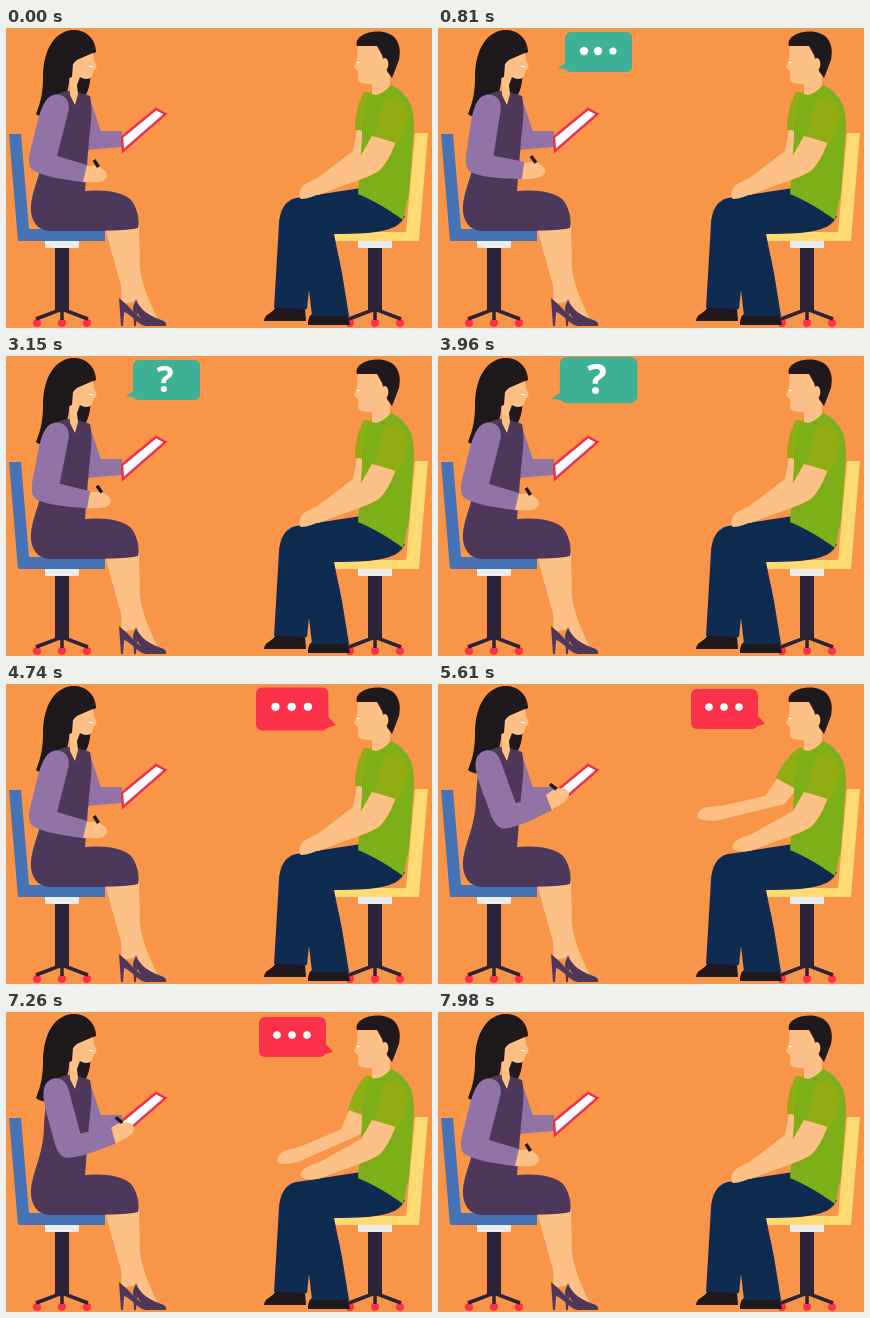
An HTML page that plays this animation: 426 px wide and 300 px high, repeating every 8010 ms.

```html
<!DOCTYPE html>
<html lang="en">
<head>
<meta charset="utf-8">
<title>Interview</title>
<style>
  html, body { margin: 0; width: 100%; height: 100%; overflow: hidden; background: #f99548; }
  svg { display: block; width: 426px; height: 300px; }
  .skin { fill: #fdc086; }
  .dark { fill: #1f191b; }
  .dress { fill: #4e3859; }
  .lilac { fill: #9273a6; }
  .shirt { fill: #7daf18; }
  .sleeve { fill: #91ad13; }
  .white { fill: #fff; }
  .post { fill: #2c2336; }
  .spokes { fill: none; stroke: #2c2336; stroke-width: 3.500; }
  .wheels { fill: #fc324b; }
  text { font: 700 36px "Open Sans", sans-serif; text-anchor: middle; }
</style>
</head>
<body>
<svg viewBox="0 0 426 300">
  <defs>
    <g id="base">
      <path fill="#ececec" d="M-17 213h34v7h-34z"/>
      <path class="post" d="M-7 220H7V284H-7z"/>
      <g class="wheels"><circle cx="-25" cy="295" r="4"/><circle cy="295" r="4"/><circle cx="25" cy="295" r="4"/></g>
      <path class="spokes" d="M-26 291L0 281 26 291M0 281V292"/>
    </g>
  </defs>
  <rect width="426" height="300" fill="#f99548"/>

  <!-- interviewer -->
  <use href="#base" x="56"/>
  <path fill="#4673b5" d="M3 106H15L23 201H99V213H12z"/>
  <path class="skin" d="M99 200L133 197 134 240C136 256 143 274 152 291L140 288 130 273 116 276 115 258z"/>
  <path class="dress" d="M113 270L121 277 131 287 146 298H139C130 295 126 287 118 284L117 298H115z"/>
  <path class="dress" d="M130 271C134 282 143 288 158 293Q161 296 160 298H147C138 295 134 288 131 285L130 298H128L127 279z"/>
  <path class="lilac" d="M80 70C87 74 90 90 95 103H116V119L80 122z"/>
  <path class="white" stroke="#f0304a" stroke-width="2.4" d="M116 109L150 81 159.500 86 117 123z"/>
  <path class="dark" d="M66 2C80 1 90 11 90 24L76 30 66 40C62 56 63 70 50 86 44 91 35 90 30 86 34 76 37 66 37 50 37 24 47 4 66 2z"/>
  <path class="dark" d="M70 46L84 44C85 54 83 62 78 70L70 72z"/>
  <path class="dress" d="M48 68Q60 61 72 64L84 68C87 80 85 95 83 112L79 163C98 161 117 164 124 171 131 178 134 192 132 200 120 203 104 202 96 203H45C31 203 24 192 25 177 26 164 32 152 35 138Q38 126 38 112L40 88Q41 73 48 68z"/>
  <path class="skin" d="M66 34L87 25 88 32 91 39 88 42 86 49Q80 53 74 49L71 57 72 66 69 77 64 67 63 38z"/>
  <path class="dark" d="M60 20L86 12 90 24C80 25 73 29 67 36L66 49 60 51z"/>
  <path class="white" d="M83 38h4v1h-4z"/>
  <g id="writeArm">
    <path class="skin" d="M77 138L90 138Q101 141 101 148C100 154 94 155 77 154z"/>
    <path id="pen" stroke="#1f191b" stroke-width="3.400" d="M88 132L92.500 139"/>
    <path class="lilac" d="M45 68C56 63 66 72 62 85L51 128 81 137 77 154C55 151 40 149 28 143 21 139 22 129 26 116 31 98 34 74 45 68z"/>
  </g>

  <!-- candidate -->
  <use href="#base" x="369"/>
  <path fill="#fedb72" d="M409 105H422L413 213H326V204H400z"/>
  <path class="dark" d="M270 279L299 280 300 293H258C258 286 267 285 270 279zM306 286H342L344 297H302C302 291 303 288 306 286z"/>
  <path fill="#0f2b50" d="M294 169.500L355 160 399 188C393 202 375 206 328 206L336 245 343 288 306 288 303 262 301 281 268 280 273 196C274 180 281 170 294 169.500z"/>
  <g id="talkArm">
    <path class="skin" d="M351 100L373 103 368 122 320 160C312 167 303 171 295 171 291 168 294 160 299 157L313 149 347 123z"/>
    <path class="sleeve" d="M358 64H368L374 104 349 102C349 86 353 72 358 64z"/>
  </g>
  <path class="skin" d="M352 18H378L384 40V62L375 68 366 66V56C360 56 354 56 352 52L352 43 348 39 351 31z"/>
  <path class="dark" d="M351 18C348 8 364 2 377 4 391 6 396 18 393 32L386 50 381 43 376 27 371 18z"/>
  <ellipse class="skin" cx="379" cy="36" rx="3.400" ry="6"/>
  <path class="white" d="M351 34h3v1h-3z"/>
  <path class="shirt" d="M362 67Q375 69 385 57C401 64 409 78 408 100L403 165 397 192C385 183 369 173 352 166L356 110C356 90 357 76 362 67z"/>
  <path class="skin" d="M366 108L390 113C386 125 380 136 373 143 360 151 340 156 320 164 310 169 300 168 295 165 293 160 299 154 312 151L355 127z"/>
  <path class="sleeve" d="M378 74C386 60 403 74 401 92L393 116 367 108C373 96 373 84 378 74z"/>

  <!-- speech -->
  <g id="ask" fill="#3eb096">
    <path d="M120 40L129 34 136 43z"/>
    <rect x="127" y="4" width="67" height="40" rx="6"/>
    <g id="askDots" class="white"><circle cx="146" cy="23"/><circle cx="160" cy="23"/><circle cx="175" cy="23"/></g>
    <g id="mark" class="white"><text x="159" y="36">?</text></g>
  </g>
  <g id="reply" fill="#fc324b">
    <path d="M327 40L319 31 312 44z"/>
    <rect x="253" y="5" width="67" height="40" rx="6"/>
    <g id="replyDots" class="white"><circle cx="271" cy="23"/><circle cx="286" cy="23"/><circle cx="301" cy="23"/></g>
  </g>
</svg>
<script>
const LOOP = 8010, PEAK = 1.17;
const $ = id => document.getElementById(id);

// piecewise linear value from [time, value] pairs
function at(t, keys) {
  if (t <= keys[0][0]) return keys[0][1];
  for (let i = 1; i < keys.length; i++) {
    const [t0, v0] = keys[i - 1], [t1, v1] = keys[i];
    if (t < t1) return v0 + (v1 - v0) * (t - t0) / (t1 - t0);
  }
  return keys[keys.length - 1][1];
}

const pop = (start, end) => [
  [start, 0], [start + 330, PEAK], [start + 560, 1],
  [end - 540, 1], [end - 310, PEAK], [end, 0]
];
const askPop = pop(30, 4290), replyPop = pop(4290, 7970);
const markPop = [[2580, 0], [2780, PEAK], [2940, 1], [3180, 1], [3300, 1.1], [3420, 1]];
const dotsOut = [[2460, 1], [2600, 0]];
const firstNote = [[560, 0], [840, 6], [1250, 14], [1700, 19.5], [2430, 11.7], [3420, 0]];
const gesture = [[4900, 0], [5370, 14.5], [5610, 24.6], [5900, 27.5], [6620, 27.5], [7980, 0]];

function scale(id, s, x, y) {
  $(id).setAttribute("transform", `translate(${x} ${y}) scale(${s}) translate(${-x} ${-y})`);
}
function turn(id, deg, x, y) {
  $(id).setAttribute("transform", `rotate(${deg} ${x} ${y})`);
}

// dots swell one after another
function dots(id, t, period, r) {
  [...$(id).children].forEach((dot, i) => {
    const d = (t % period) / period * 5 - i;
    const swell = d > 0 && d < 2 ? Math.sin(d * Math.PI / 2) : 0;
    dot.setAttribute("r", r + swell * .8);
  });
}

function draw(t) {
  const reach = t > 4740 && t < 7980 ? Math.sin((t - 4740) / 3240 * Math.PI) : 0;
  const note = t < 4000 ? at(t, firstNote) : 45.5 * reach;
  turn("writeArm", -note, 50, 80);
  turn("pen", note * .42, 92, 140);
  turn("talkArm", at(t, gesture), 362, 72);

  scale("ask", at(t, askPop), 160, 24);
  scale("reply", at(t, replyPop), 290, 25);
  scale("askDots", at(t, dotsOut), 160, 23);
  scale("mark", at(t, markPop), 159, 24);
  dots("askDots", t + 318, 870, 3.6);
  dots("replyDots", t - 4740 + 860, 870, 3.8);
}

const start = performance.now();
function frame() {
  draw((performance.now() - start) % LOOP);
  requestAnimationFrame(frame);
}
frame();
</script>
</body>
</html>
```
